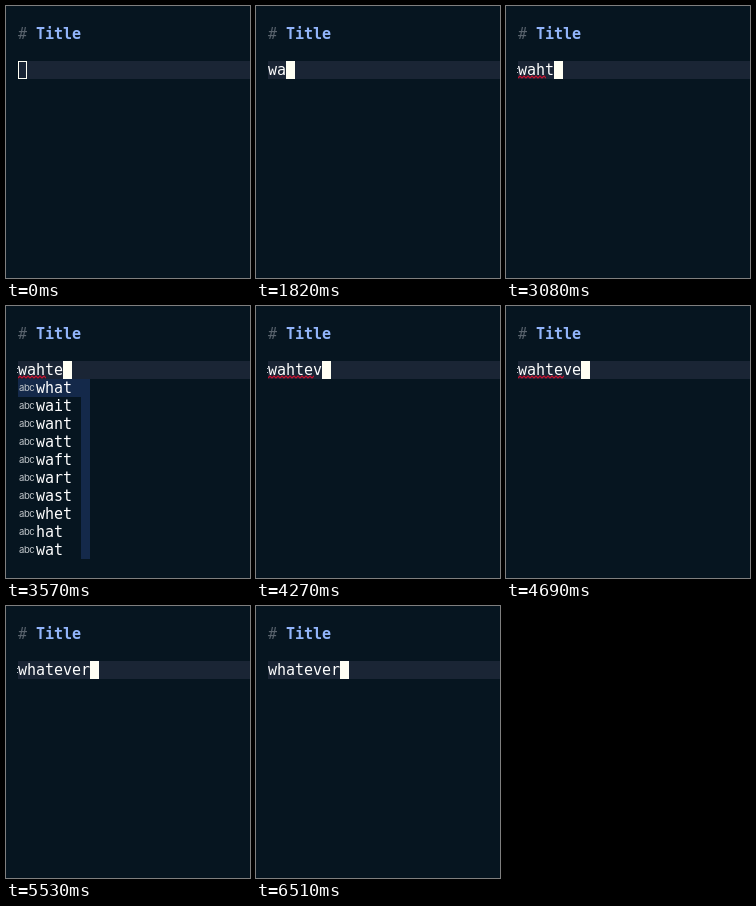
These frames come from a looping animation (244x272 px, 7000 ms). An HTML page:

```html
<!DOCTYPE html>
<html lang="en">
<head>
<meta charset="utf-8">
<title>Spelling completion</title>
<style>
html, body { margin: 0; width: 100%; height: 100%; overflow: hidden; background: #061520; }
body {
  position: relative;
  font: 15px/18px "DejaVu Sans Mono", monospace;
  letter-spacing: -0.03px;
  color: #fff;
  white-space: pre;
}
body > *, #menu * { position: absolute; }
#title { left: 12px; top: 19px; color: #59636d; }
#title b { color: #92b5fb; }
#line { left: 12px; right: 0; top: 55px; height: 18px; background: #1a2535; }
#text { left: 12px; top: 55px; }
#cursor { top: 55px; width: 9px; height: 18px; box-sizing: border-box; border: 1px solid #fffff4; }
#wave { left: 12px; top: 69px; height: 4px; overflow: hidden; }
#wave path { fill: none; stroke: #c8102e; stroke-width: 1.2; }
#mark { left: 11px; top: 62px; width: 1px; height: 1px; background: #b9c0c6; box-shadow: 0 4px #b9c0c6; }
#menu { left: 12px; top: 73px; height: 180px; background: #061520; }
#menu i { left: 0; top: 0; height: 18px; width: 100%; background: #14294a; }
#menu u { right: 0; top: 0; height: 100%; width: 9px; background: #14294a; }
#menu span { left: 18px; }
#menu small { left: 1px; font: 9.5px/18px Inter, sans-serif; letter-spacing: -0.4px; color: #c3c8cc; }
</style>
</head>
<body>
<div id="title"># <b>Title</b></div>
<div id="line"></div>
<div id="cursor"></div>
<div id="text"></div>
<svg id="wave"><path/></svg>
<div id="mark"></div>
<div id="menu"></div>
<script>
const LOOP = 7000, CHAR = 9, ROW = 18;
const el = id => document.getElementById(id);

// Each track is a list of [start time, value].
const typed = [[0, ""], [1400, "w"], [1820, "wa"], [2380, "wah"], [3080, "waht"],
  [3570, "wahte"], [4270, "wahtev"], [4690, "wahteve"], [5040, "wahtever"], [5460, "whatever"]];
const cursor = [[0, "hollow"], [980, "solid"], [6020, "off"], [6510, "solid"]];
const wave = [[0, 0], [2310, 2], [2940, 3], [4130, 5], [5460, 0]];
const mark = [[0, false], [2310, true], [5950, false]];
const menu = [
  [0, ""],
  [2450, "wah what wash hah way war was wait wax wag"], [3080, ""],
  [3150, "what wait want watt waft wart wast whet hat wat"],
  [3640, "white waste water wheat write whet wanted waited wasted wafted"], [4270, ""],
  [4340, "whatever water waste waited wave waver wheat white wanted waters"], [4690, ""],
  [4760, "whatever water waver wave waited wheeze waste whence wattle whiten"], [5040, ""],
  [5110, "whatever whoever whatsoever wherever water waver waterier whenever whitener whomever"],
  [5460, ""]
];
const at = (track, t) => track.findLast(([start]) => start <= t)[1];

let zigzag = "M0 3";
for (let x = 2; x < 100; x += 2) zigzag += `L${x} ${x % 4 ? 1 : 3}`;
document.querySelector("#wave path").setAttribute("d", zigzag);

let shown = "";
function showMenu(list) {
  if (list === shown) return;
  shown = list;
  const words = list ? list.split(" ") : [];
  const longest = Math.max(0, ...words.map(w => w.length));
  el("menu").style.width = list ? (longest + 4) * CHAR + "px" : 0;
  el("menu").innerHTML = list && "<i></i><u></u>" + words.map((word, n) =>
    `<small style="top:${n * ROW}px">abc</small><span style="top:${n * ROW}px">${word}</span>`).join("");
}

function draw(now) {
  const t = now % LOOP, word = at(typed, t), look = at(cursor, t);
  el("text").textContent = word;
  const c = el("cursor").style;
  c.left = 12 + word.length * CHAR + "px";
  c.background = look === "solid" ? "#fffff4" : "none";
  c.visibility = look === "off" ? "hidden" : "visible";
  el("wave").style.width = at(wave, t) * CHAR + 1 + "px";
  el("wave").style.visibility = at(wave, t) ? "visible" : "hidden";
  el("mark").style.visibility = at(mark, t) ? "visible" : "hidden";
  showMenu(at(menu, t));
}

const begin = performance.now();
function tick() {
  draw(performance.now() - begin);
  requestAnimationFrame(tick);
}
tick();
</script>
</body>
</html>
```
